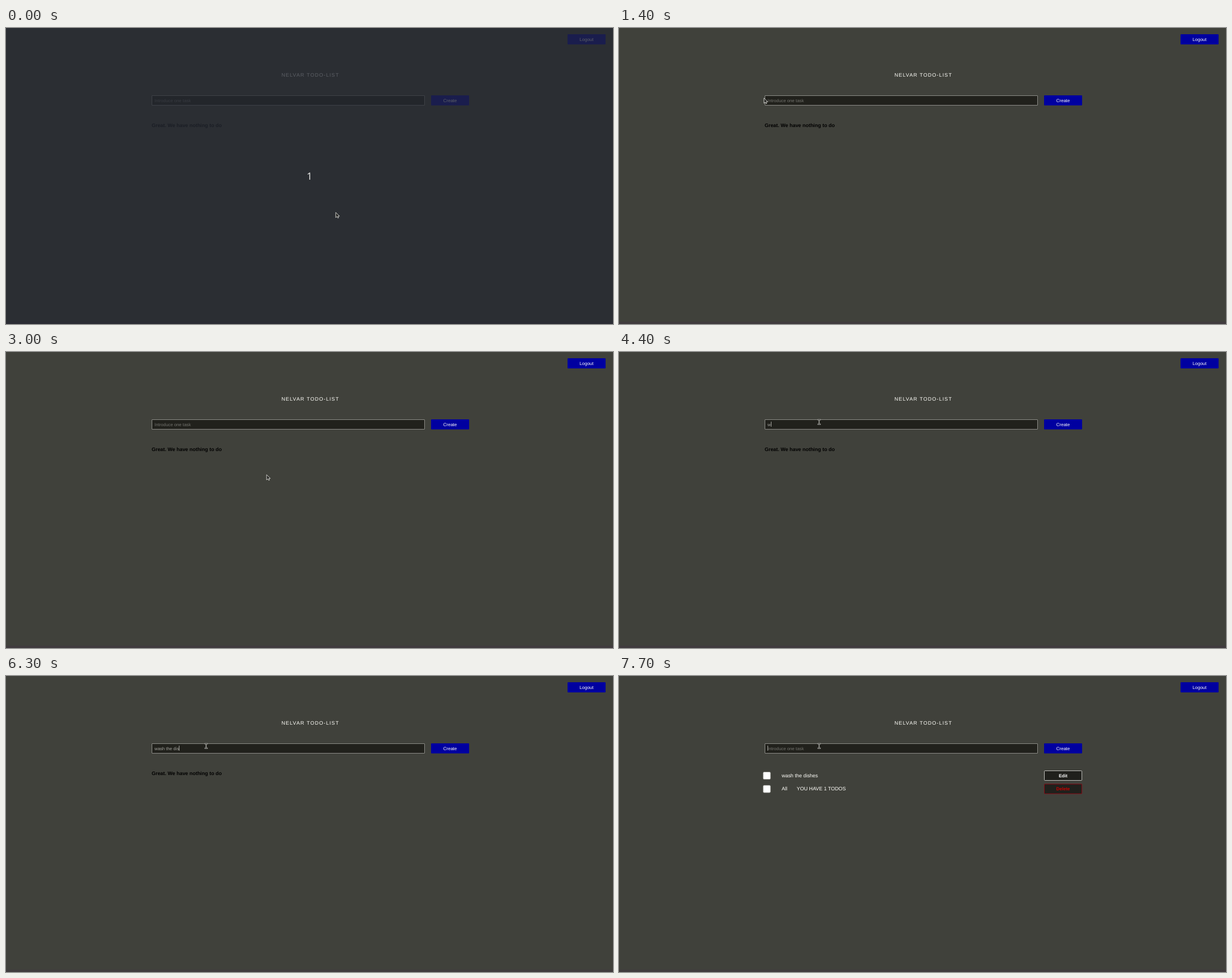
Write an HTML page with a canvas that moves like this. It is 1071 px wide and 523 px high and loops after 8 s.

```html
<!DOCTYPE html>
<html lang="en">
<head>
<meta charset="utf-8">
<title>Todo list</title>
<style>
  html, body { margin: 0; width: 100%; height: 100%; overflow: hidden; background: #40413b; }
  canvas { display: block; }
</style>
</head>
<body>
<canvas id="stage" width="1071" height="523"></canvas>
<script>
const W = 1071, H = 523, LOOP = 8000, STEP = 100;
const ctx = document.getElementById('stage').getContext('2d');
const SANS = '"Liberation Sans", Arial, sans-serif';
const LARGE = 8.93, BUTTON = 8.03, FIELD = 7.81;
const TASK = 'wash the dishes';
const FOCUS = 3500, TYPE_START = 4400, TYPE_END = 6800, SUBMIT = 7700, BLINK = 600;

// The pointer glides to each place and rests there.
const home = { x: 581, y: 325 };
const glides = [
  { start: 900, end: 1100, x: 198, y: 88 },
  { start: 1200, end: 1400, x: 255, y: 123 },
  { start: 1400, end: 1600, x: 262, y: 151 },
  { start: 1600, end: 2000, x: 159, y: 110 },
  { start: 2100, end: 2500, x: 455, y: 250 },
  { start: 2600, end: 2800, x: 263, y: 160 },
  { start: 2800, end: 3000, x: 459, y: 216 },
  { start: 3100, end: 3500, x: 353, y: 123 }
];

const clamp = v => Math.min(1, Math.max(0, v));
const lerp = (a, b, k) => a + (b - a) * k;
const progress = (t, start, end) => clamp((t - start) / (end - start));

function pointerAt(t) {
  return glides.reduce((p, g) => {
    const k = progress(t, g.start, g.end);
    return { x: lerp(p.x, g.x, k), y: lerp(p.y, g.y, k) };
  }, home);
}

// Quick typing, a short hesitation, then quick again.
function typedAt(t) {
  if (t < TYPE_START || t >= SUBMIT) return '';
  const count = 1 + 9 * progress(t, TYPE_START, 5700)
                  + 2 * progress(t, 5700, 6300)
                  + 3 * progress(t, 6300, TYPE_END);
  return TASK.slice(0, Math.floor(count + 0.4));
}

function caretVisible(t) {
  if (t < FOCUS) return false;
  if (t >= TYPE_START && t < TYPE_END) return true;
  const since = [SUBMIT, TYPE_END, FOCUS].find(s => t >= s);
  return (t - since) % (2 * BLINK) < BLINK;
}

function rect(x, y, w, h, color) {
  ctx.fillStyle = color;
  ctx.fillRect(x, y, w, h);
}

function roundBox(x, y, w, h, r, fill, border, lineWidth = 0.8) {
  ctx.beginPath();
  ctx.roundRect(x, y, w, h, r);
  ctx.fillStyle = fill;
  ctx.fill();
  if (border) {
    ctx.strokeStyle = border;
    ctx.lineWidth = lineWidth;
    ctx.stroke();
  }
}

function text(str, x, y, { size = LARGE, color = '#fffffa', weight = 400, align = 'left',
                           spacing = 0, family = SANS } = {}) {
  ctx.font = `${weight} ${size}px ${family}`;
  ctx.textRendering = 'geometricPrecision';
  ctx.letterSpacing = spacing + 'px';
  ctx.textAlign = align;
  ctx.fillStyle = color;
  ctx.fillText(str, x, y);
  return ctx.measureText(str).width;
}

function button(label, x, y) {
  roundBox(x, y, 67.1, 17.9, 1, '#0000a0');
  text(label, x + 33.5, y + 11.9, { size: BUTTON, align: 'center' });
}

function outlineButton(label, y, color, border) {
  roundBox(750.5, y + 0.5, 66.2, 17, 1, '#20201c', border);
  text(label, 783.5, y + 11.9, { size: BUTTON, weight: 700, color, align: 'center' });
}

function checkbox(y) {
  roundBox(254.2, y + 0.5, 13.2, 13.2, 2, '#ffffff', '#767670');
}

function drawField(t) {
  const typed = typedAt(t);
  roundBox(257.5, 119.5, 481, 17, 0.5, '#21211c', '#a4a49f');
  const width = text(typed, 262, 130.6, { size: FIELD, color: '#a3a39d' });
  if (!typed) text('Introduce one task', 262, 130.6, { size: FIELD, color: '#73736e' });
  if (caretVisible(t)) rect(262 + Math.round(width), 123, 1, 9, '#a3a39d');
}

function drawTasks() {
  checkbox(169);
  text(TASK, 287, 178.8);
  outlineButton('Edit', 167, '#ffffff', '#e6e6e2');
  checkbox(192.5);
  text('All', 287, 202.2);
  text('YOU HAVE 1 TODOS', 313.5, 202.2);
  outlineButton('Delete', 190.5, '#cc0000', '#a00010');
}

function drawPage(t) {
  rect(0, 0, W, H, '#40413b');
  rect(0, 519, W, 4, '#403b3e');
  button('Logout', 990.8, 11.1);
  text('NELVAR TODO-LIST', 486, 86.2, { spacing: 1.116 });
  drawField(t);
  button('Create', 750, 118.9);
  if (t < SUBMIT) text('Great. We have nothing to do', 257, 174.7, { weight: 700, color: '#000' });
  else drawTasks();
}

function drawCountdown() {
  rect(0, 0, W, H, 'rgba(36, 40, 49, 0.74)');
  text('1', 535.5, 268, {
    size: 17.5, color: '#eeeeec', align: 'center', family: '"Open Sans", "Noto Sans", sans-serif'
  });
}

function drawArrow(x, y) {
  ctx.save();
  ctx.translate(x + 0.8, y + 0.8);
  ctx.fillStyle = '#2a2a28';
  ctx.strokeStyle = '#e4e4e0';
  ctx.lineWidth = 0.85;
  const shape = new Path2D('M0 0V9.2L2.2 7.3L3.7 10L5.1 9.4L3.9 6.7L6.6 6.5Z');
  ctx.fill(shape);
  ctx.stroke(shape);
  ctx.restore();
}

function drawBeam(x, y) {
  ctx.save();
  ctx.translate(x + 0.2, y + 0.6);
  ctx.lineCap = 'square';
  const shape = new Path2D('M-2 -4H2M0 -4V4M-2 4H2');
  for (const [color, width] of [['#d0d0cb', 1.7], ['#30302c', 0.6]]) {
    ctx.strokeStyle = color;
    ctx.lineWidth = width;
    ctx.stroke(shape);
  }
  ctx.restore();
}

function drawPointer(t) {
  const { x, y } = pointerAt(t);
  const overField = x >= 257 && x <= 739 && y >= 119 && y <= 137;
  (overField ? drawBeam : drawArrow)(x, y);
}

function render(time) {
  const t = Math.floor(time / STEP) * STEP;
  drawPage(t);
  if (t < 500) drawCountdown();
  drawPointer(t);
}

const start = performance.now();
function tick() {
  render((performance.now() - start) % LOOP);
  requestAnimationFrame(tick);
}
tick();
</script>
</body>
</html>
```
